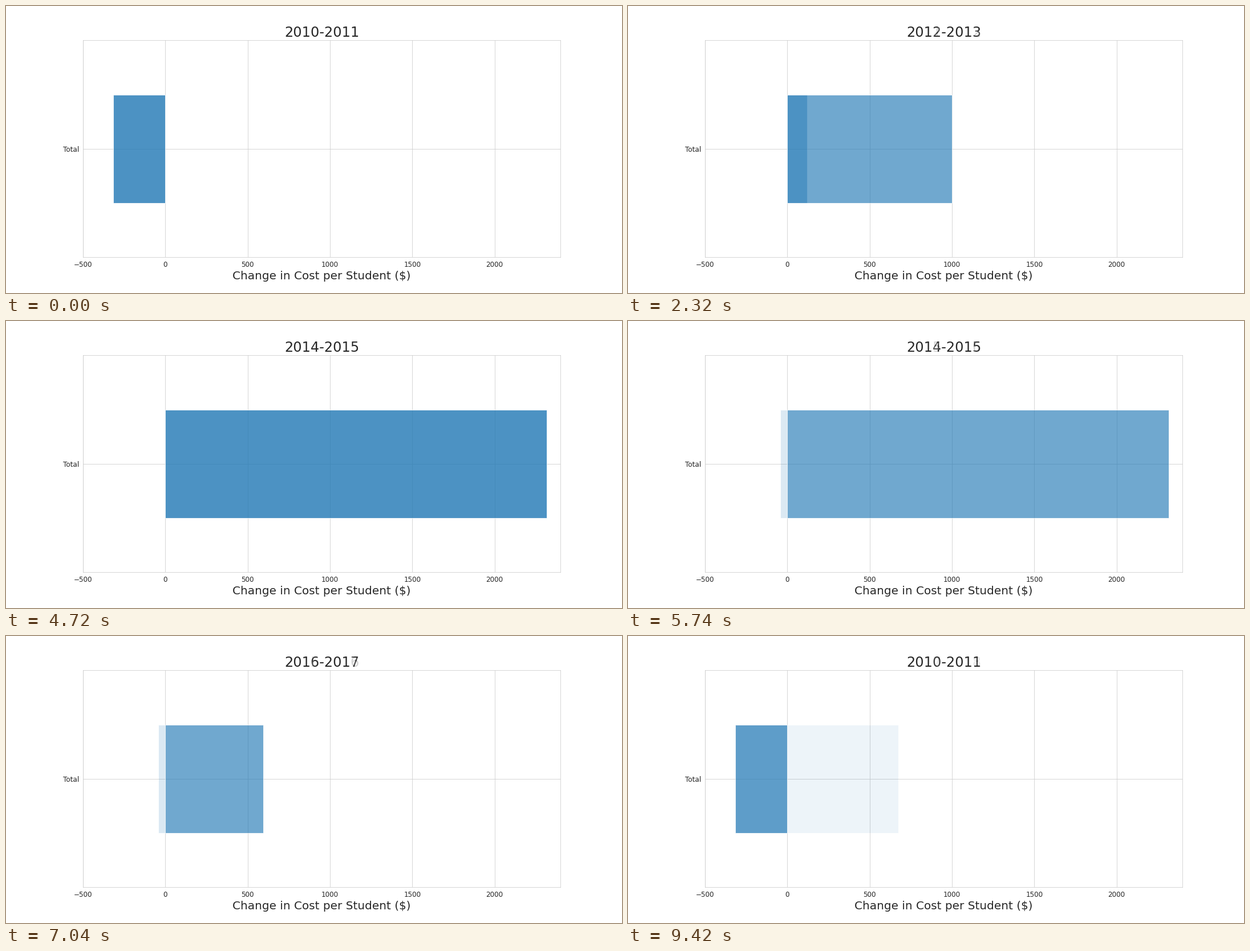
These frames come from a looping animation (1080 px wide and 504 px high, 9.44 s). A matplotlib script:

```python
import numpy as np
import matplotlib.pyplot as plt
from matplotlib.animation import FuncAnimation

STEP = 20                # ms per frame
HOLD, FADE = 50, 9       # frames a year rests, frames of its cross-fade
CYCLE = HOLD + FADE
FIRST_YEAR = 2010
CHANGES = [-315, 118.5, 1000, 839, 2318.5, -41, 596, 676]
INK, RULE = "0.15", "0.8"

plt.rcParams.update({
    "font.family": "DejaVu Sans",
    "text.color": INK,
    "axes.labelcolor": INK,
    "axes.edgecolor": RULE,
    "axes.axisbelow": True,
    "grid.color": RULE,
    "grid.linewidth": 0.8,
    "xtick.color": INK,
    "ytick.color": INK,
    "xtick.labelsize": 12,
    "ytick.labelsize": 12,
    "xtick.bottom": False,
    "ytick.left": False,
})

fig = plt.figure(figsize=(15, 7), dpi=72, facecolor="white")


def draw_chart(year, change):
    """Draw one year's bar chart and return it as an RGB array."""
    fig.clear()
    ax = fig.add_axes([0.125, 0.125, 0.775, 0.755])
    ax.barh([0], [change], height=0.5, color="#1f77b4", alpha=0.8,
            edgecolor="white", linewidth=1)
    ax.set_xlim(-500, 2400)
    ax.set_ylim(-0.5, 0.5)
    ax.set_xticks(range(-500, 2001, 500))
    ax.set_yticks([0], ["Total"])
    ax.grid(True)
    ax.set_title(f"{year}-{year + 1}", fontsize=24)
    ax.set_xlabel(r"Change in Cost per Student (\$)", fontsize=20)
    fig.canvas.draw()
    return np.array(fig.canvas.buffer_rgba())[..., :3].astype(float)


charts = [draw_chart(FIRST_YEAR + i, c) for i, c in enumerate(CHANGES)]
fig.clear()
view = fig.figimage(charts[0].astype(np.uint8), origin="upper")


def update(frame):
    index, tick = divmod(frame, CYCLE)
    mix = max(0, tick - HOLD + 1) / (FADE + 1)
    picture = charts[index]
    if mix:
        following = charts[(index + 1) % len(charts)]
        picture = (1 - mix) * picture + mix * following
    view.set_data(np.rint(picture).astype(np.uint8))
    return [view]


anim = FuncAnimation(fig, update, frames=CYCLE * len(charts), interval=STEP,
                     repeat=True, repeat_delay=0, cache_frame_data=False)
plt.show()
```
